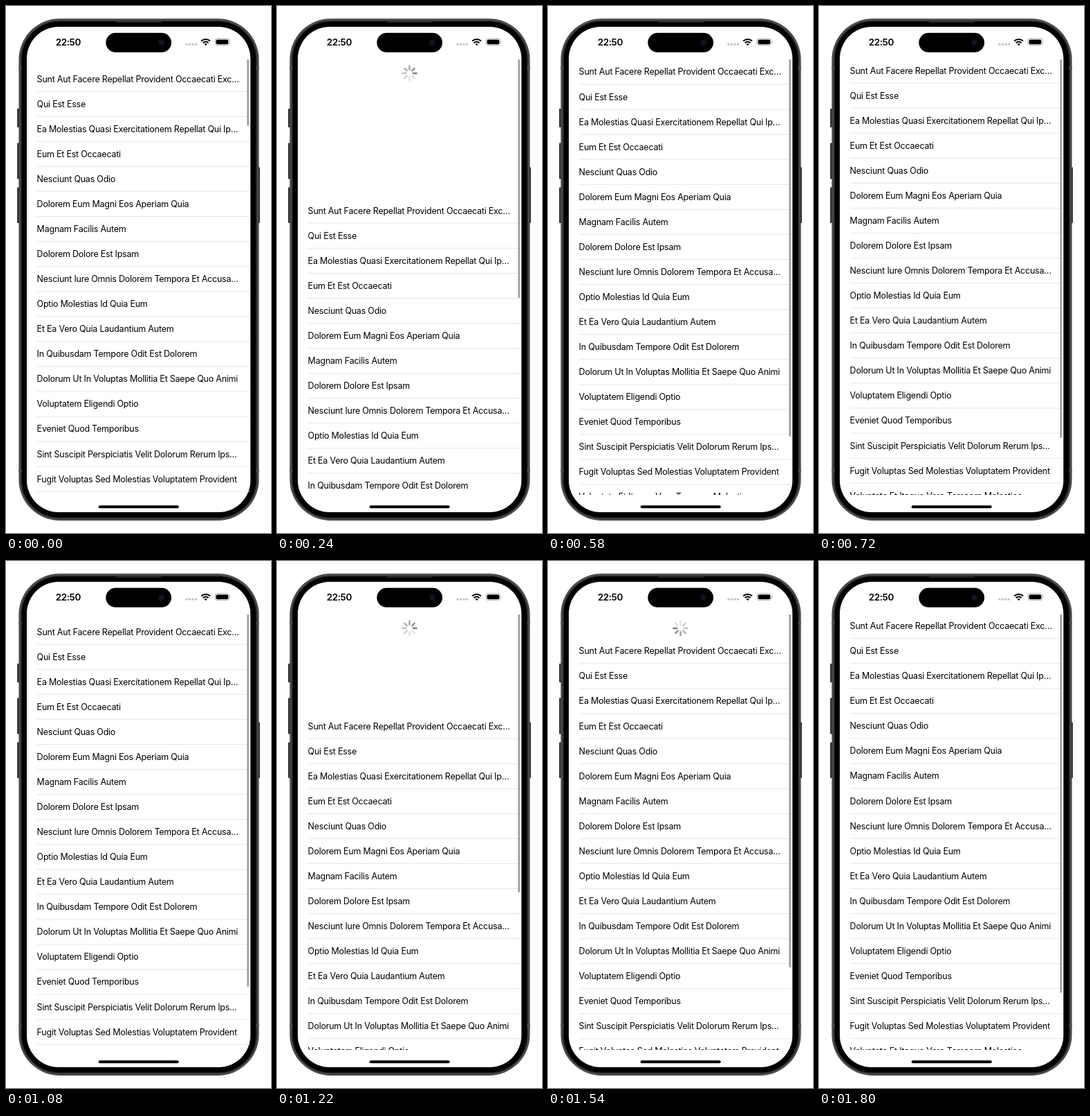
An HTML page that plays this animation: 383x760 px, repeating every 1820 ms.

```html
<!DOCTYPE html>
<html lang="la">
<head>
<meta charset="utf-8">
<title>Pull to refresh</title>
<style>
html, body { margin: 0; width: 100%; height: 100%; overflow: hidden; background: #fff; }
svg { display: block; width: 100%; height: 100%; }
text { font-family: Inter, Roboto, sans-serif; fill: #000; }
#rows text { font-size: 12.5px; letter-spacing: -.23px; }
.clock { font-size: 13.5px; font-weight: 600; letter-spacing: -.4px; }
</style>
</head>
<body>
<svg viewBox="0 0 383 760">
  <defs>
    <clipPath id="view"><rect x="30" y="70" width="323" height="635"/></clipPath>
  </defs>

  <g fill="#3c3d3e">
    <rect x="16" y="148" width="4" height="27" rx="1"/>
    <rect x="16" y="197.5" width="4" height="52" rx="1"/>
    <rect x="16" y="261.5" width="4" height="51.5" rx="1"/>
    <rect x="363" y="232.5" width="4" height="80.5" rx="1"/>
  </g>
  <rect x="18.5" y="18.3" width="347" height="723.6" rx="59" fill="#343536"/>
  <rect x="20.2" y="20" width="343.6" height="720.2" rx="57.3" fill="#2a2b2c" stroke="#58595a" stroke-width="1.3"/>
  <path d="M18.5 90h4M361.5 90h4M18.5 670h4M361.5 670h4" stroke="#4c4d4e" stroke-width="4"/>
  <rect x="22.8" y="22.6" width="338.4" height="715" rx="54" fill="#000"/>
  <path d="M160 23h64" stroke="#2b2b2b" stroke-width="1.8" stroke-linecap="round"/>
  <rect x="30" y="30" width="323.3" height="700" rx="46" fill="#fff"/>

  <text class="clock" x="71.7" y="57">22:50</text>
  <rect x="144.3" y="38.8" width="94.7" height="28" rx="14"/>
  <circle cx="224.5" cy="52.8" r="5" fill="#0c0d18"/>
  <circle cx="224.5" cy="52.8" r="2" fill="#17193a"/>
  <g fill="#c6c6c6">
    <circle cx="261" cy="55.3" r="1.7"/><circle cx="265.5" cy="55.3" r="1.7"/>
    <circle cx="270" cy="55.3" r="1.7"/><circle cx="274.5" cy="55.3" r="1.7"/>
  </g>
  <g fill="none" stroke="#000" stroke-width="2.1">
    <path d="M282.2 50.6a9.2 9.2 0 0 1 12.8 0M284.7 53.2a5.7 5.7 0 0 1 7.8 0"/>
    <path d="M288.6 57.3l-2.1-2.2a3 3 0 0 1 4.2 0z" fill="#000" stroke="none"/>
  </g>
  <rect x="302" y="46.9" width="20.8" height="9.8" rx="3.2" fill="none" stroke="#a5a5a5" stroke-width=".9"/>
  <rect x="303.5" y="48.4" width="17.8" height="6.8" rx="2"/>
  <path d="M324 50.2q1.6 1.6 0 3.2z" fill="#a5a5a5"/>

  <g id="spinner" stroke="#000" stroke-width="2.4" stroke-linecap="round"></g>
  <g clip-path="url(#view)"><g id="rows"></g></g>
  <rect id="bar" x="348.4" y="77" width="2.5" rx="1.25" fill="#989898"/>
  <rect x="133.7" y="720.2" width="116" height="4" rx="2"/>
</svg>
<script>
const LOOP = 1820, STEP = 20, PITCH = 36.06, TOP = 93, SPOKES = 8, STIFF = .0195;
const titles = [
  'Sunt Aut Facere Repellat Provident Occaecati Exc…', 'Qui Est Esse',
  'Ea Molestias Quasi Exercitationem Repellat Qui Ip…', 'Eum Et Est Occaecati',
  'Nesciunt Quas Odio', 'Dolorem Eum Magni Eos Aperiam Quia', 'Magnam Facilis Autem',
  'Dolorem Dolore Est Ipsam', 'Nesciunt Iure Omnis Dolorem Tempora Et Accusa…',
  'Optio Molestias Id Quia Eum', 'Et Ea Vero Quia Laudantium Autem',
  'In Quibusdam Tempore Odit Est Dolorem', 'Dolorum Ut In Voluptas Mollitia Et Saepe Quo Animi',
  'Voluptatem Eligendi Optio', 'Eveniet Quod Temporibus',
  'Sint Suscipit Perspiciatis Velit Dolorum Rerum Ips…',
  'Fugit Voluptas Sed Molestias Voluptatem Provident',
  'Voluptate Et Itaque Vero Tempora Molestiae'
];
// start, release and end of each drag, its travel, and the spinner's phase
const pulls = [
  { start: 0, peak: 180, release: 235, end: 720, from: 12, reach: 203, phase: 7 },
  { start: 1080, peak: 1371, release: 1371, end: LOOP, from: 9, reach: 231, phase: 3 }
];

const byId = id => document.getElementById(id);
const clamp = (v, lo = 0, hi = 1) => Math.min(hi, Math.max(lo, v));
function add(parent, tag, attrs) {
  const el = document.createElementNS('http://www.w3.org/2000/svg', tag);
  for (const key in attrs) el.setAttribute(key, attrs[key]);
  return parent.appendChild(el);
}

const rows = byId('rows'), spinner = byId('spinner'), bar = byId('bar');
titles.forEach((title, i) => {
  const y = i * PITCH;
  add(rows, 'text', { x: 44.6, y: y + 4.6 }).textContent = title;
  add(rows, 'path', { d: `M45 ${y + 18.2}H352.5`, stroke: '#e2e2e3', 'stroke-width': .9 });
});
const spokes = Array.from({ length: SPOKES }, (_, i) =>
  add(spinner, 'path', { d: 'M0 -5.2V-10.2', transform: `rotate(${i * 360 / SPOKES})` }));

function offsetAt(t, p) {
  if (t < p.release) {
    const k = clamp((t - p.start) / (p.peak - p.start));
    return p.from + (p.reach - p.from) * Math.sin(k * Math.PI / 2) ** 1.3;
  }
  const u = STIFF * (t - p.release);   // critically damped spring
  return p.reach * (1 + u) * Math.exp(-u);
}

function drawSpinner(t, p, offset) {
  const pulling = t < p.release && offset < 115;
  const shown = pulling ? Math.floor((offset - 25) / 90 * SPOKES) : SPOKES;
  const fade = pulling ? 1 : clamp((offset - 12) / 24);
  const head = Math.floor(t / 80) + p.phase;
  spokes.forEach((spoke, i) => {
    const age = (head - i + SPOKES * 8) % SPOKES;
    const alpha = pulling ? .3 : .5 - .38 * Math.min(age, 6) / 6;
    spoke.setAttribute('stroke-opacity', i < shown ? alpha * fade : 0);
  });
  spinner.setAttribute('transform', `translate(191.5 97) scale(${.6 + .4 * fade})`);
}

function draw(now) {
  const t = Math.floor(now % LOOP / STEP) * STEP;
  const p = pulls.find(p => t >= p.start && t < p.end);
  const offset = p ? offsetAt(t, p) : 0;
  rows.setAttribute('transform', `translate(0 ${TOP + offset})`);
  // the long list gives way to a short one once the refresh fires
  const full = t < 140 ? 108 : 546;
  bar.setAttribute('height', Math.max(7, full - offset));
  drawSpinner(t, p || pulls[0], offset);
}

const begin = performance.now();
function tick() {
  draw(performance.now() - begin);
  requestAnimationFrame(tick);
}
tick();
</script>
</body>
</html>
```
